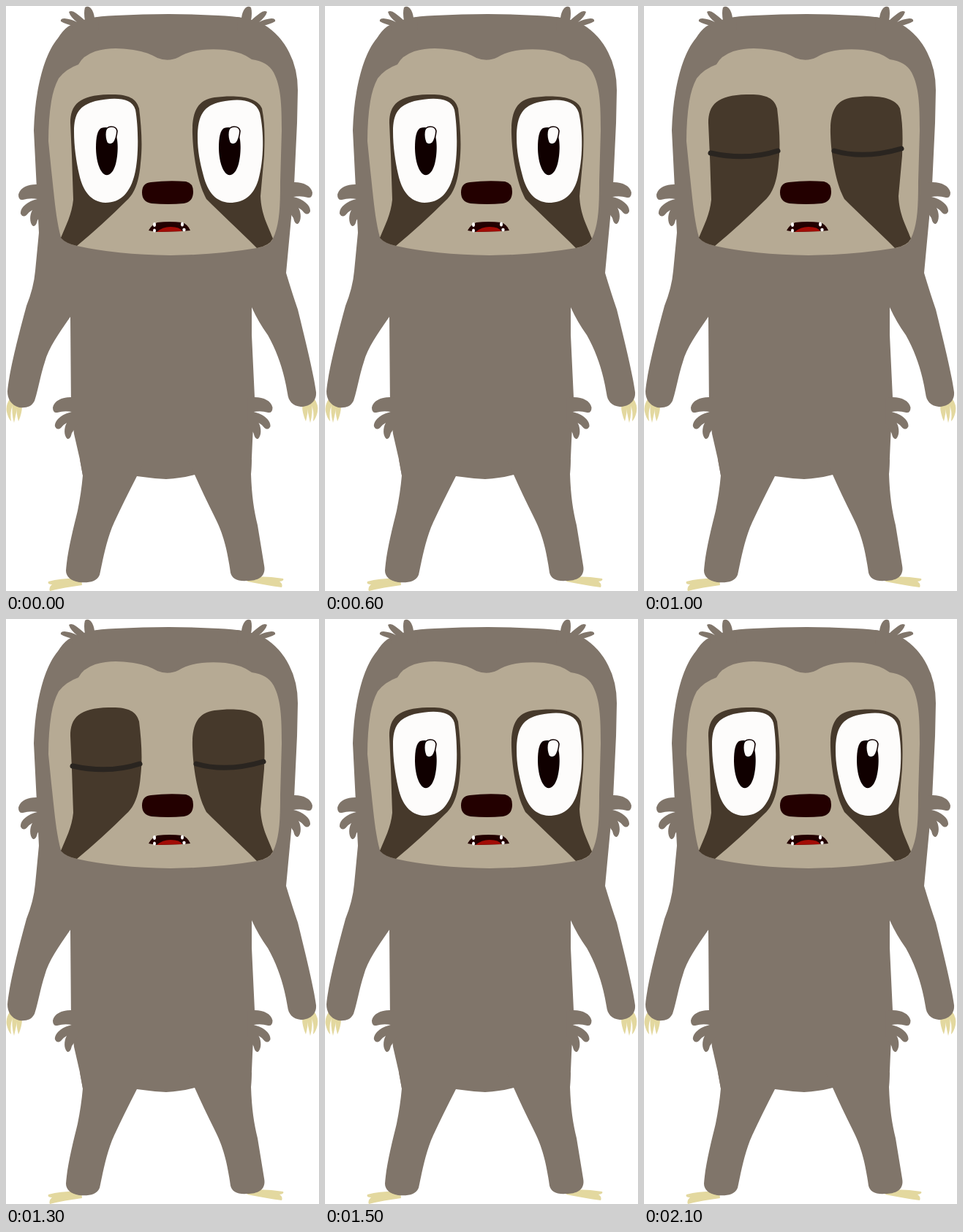
An HTML page that plays this animation: 428 by 800 pixels, repeating every 2.5 s.

```html
<!DOCTYPE html>
<html lang="en">
<head>
<meta charset="utf-8">
<title>Blinking sloth</title>
<style>
  html, body { margin: 0; width: 100%; height: 100%; overflow: hidden; background: #fff; }
  svg { display: block; width: 100%; height: 100%; }
  .fur { fill: #80756a; }
  .face { fill: #b6aa94; }
  .patch { fill: #46392b; }
  .white { fill: #fdfcfb; }
  .pupil { fill: #100000; }
  .shine { fill: #fdfcfb; stroke: #100000; stroke-width: 1.6; }
  .nose { fill: #230000; }
  .tongue { fill: #a20c06; }
  .claw { fill: #e3d89f; }
  .lid { fill: none; stroke: #2a2520; stroke-width: 7; stroke-linecap: round; }
  .open { animation: open 2.5s step-end infinite; }
  .closed { animation: closed 2.5s step-end infinite; }
  @keyframes open { 0%, 60% { opacity: 1; } 40% { opacity: 0; } }
  @keyframes closed { 0%, 60% { opacity: 0; } 40% { opacity: 1; } }
</style>
</head>
<body>
<svg viewBox="0 0 428 800" preserveAspectRatio="none">
  <defs>
    <path id="tuft" d="M98 536 Q92 535 88 535 C76 535 66 540 64 549 Q64 557 70 556 Q80 553 90 555
      C76 558 66 567 67 575 Q70 581 75 577 Q79 572 83 570 C79 577 79 588 84 592 Q88 593 90 584 L98 572Z"/>
    <path id="crest" d="M90 34 L92 27 Q82 25 75 21 Q74 17 80 17 Q90 18 97 22 Q88 15 86 8 Q90 5 96 10
      Q104 16 108 20 Q106 9 108 2 Q112 -1 116 3 Q120 8 121 16 L127 15 L126 34Z"/>
    <g id="handClaws">
      <path d="M6 536 Q-1 546 1 555 Q3 564 7 568 Q5 554 10 544Z"/>
      <path d="M9 541 Q7 556 11 570 Q14 557 16 545Z"/>
      <path d="M14 544 Q14 557 17 568 Q22 557 22 546Z"/>
    </g>
    <g id="pupil">
      <path class="pupil" d="M130 167 Q138 164 147 169 C154 178 154 200 150 216 C147 227 142 232 136 231 C128 228 123 211 123 193 C123 180 125 170 130 167Z"/>
      <path class="shine" d="M136 172 Q137 165 144 165 Q151 165 152 171 Q151 182 147 187 Q142 191 138 187 Q135 180 136 172Z"/>
    </g>
  </defs>

  <g class="claw">
    <use href="#handClaws"/>
    <use href="#handClaws" transform="matrix(-1 0 0 1 427 0)"/>
    <path d="M103 783 Q78 782 58 787 Q56 791 63 791 Q58 795 60 800 Q80 795 104 792Z"/>
    <path d="M330 781 Q355 779 379 783 Q381 786 374 787 Q379 790 377 795 Q355 792 330 787Z"/>
  </g>

  <g class="fur">
    <!-- head, arms and torso -->
    <path d="M85 28 Q108 14 150 13 Q225 9 290 13 Q330 14 352 25 Q375 39 387 63 Q399 86 399 115 L398 160 L394 245
      L390 290 L383 365 Q392 395 399 415 C410 460 420 500 424 528 C425 541 415 548 403 548 C392 547 386 540 385 530
      C380 500 372 475 358 450 Q345 432 336 412 L336 450 L340 535 L337 595 L335 640
      L258 641 Q240 646 219 647 Q200 646 179 643 L105 642 L101 620 L93 585 L89 550 L88 425
      C72 448 58 468 53 487 C47 505 44 525 39 540 C35 548 28 550 18 549 C7 546 2 537 2 527 C4 502 17 450 28 410
      Q38 385 40 362 L45 310 L42 250 L38 170 Q39 140 43 118 C48 90 56 62 71 44 Q78 33 85 28Z"/>
    <!-- legs -->
    <path d="M101 620 L105 642 Q103 665 98 690 C92 715 84 745 82 772 C82 780 88 786 100 788 C112 789 124 788 128 778
      C132 760 137 730 148 706 Q160 680 179 643 L190 620Z"/>
    <path d="M336 620 L335 640 C336 670 339 690 344 710 L353 765 C356 780 345 786 330 786 C316 787 309 783 307 775
      C302 740 297 722 285 698 Q270 668 258 641 L248 620Z"/>
    <use href="#tuft"/>
    <use href="#tuft" x="-47" y="-291"/>
    <use href="#tuft" transform="matrix(-1 0 0 1 428.500 0)"/>
    <use href="#tuft" transform="matrix(-1 0 0 1 483 -294)"/>
    <use href="#crest"/>
    <use href="#crest" transform="matrix(-1 0 0 1 443 0)"/>
  </g>

  <path class="face" d="M58 185 Q58 155 62 130 Q65 112 72 99 Q82 86 99 80 Q105 68 122 62 Q136 58 150 58
    C180 59 195 64 207 71 Q222 77 236 70 C252 60 275 58 300 60 Q323 63 336 73 Q358 76 366 91 C376 110 377 135 377 170
    L375 240 C375 275 374 300 365 318 Q361 328 343 331 Q290 340 225 341 Q150 340 97 328 Q82 325 75 316
    C68 290 66 260 62 225Z"/>

  <g class="patch">
    <path d="M88 160 C88 135 100 122 140 121 C165 120 178 125 182 140 C185 165 187 190 184 215
      C182 240 176 256 165 266 Q132 299 97 328 Q82 325 75 317 C82 300 90 285 92 265 L90 205Z"/>
    <path d="M255 175 C254 145 262 128 285 125 C310 122 342 122 350 140 C354 160 354 180 353 205 L348 260
      C349 285 358 300 365 318 Q360 328 343 331 C316 304 292 282 274 264 C264 246 256 210 255 175Z"/>
  </g>

  <g class="open">
    <path class="white" d="M93 172 C93 146 101 136 122 130 C146 125 172 124 177 142 C181 164 182 205 176 230
      C170 255 157 269 136 269 C116 268 105 253 100 230 C96 212 93 192 93 172Z"/>
    <path class="white" d="M262 180 C262 148 271 136 294 131 C318 126 341 127 347 146 C353 172 353 210 345 238
      C338 260 325 269 306 269 C287 268 276 255 270 232 C265 213 262 198 262 180Z"/>
    <use href="#pupil"/>
    <use href="#pupil" x="168"/>
  </g>
  <g class="closed">
    <path class="lid" d="M91 201 Q140 212 183 198"/>
    <path class="lid" d="M260 198 Q301 210 352 195"/>
  </g>

  <path class="nose" d="M198 241 Q222 238 246 240 Q256 242 256 254 Q256 268 243 270 Q222 272 199 270 Q186 268 186 255 Q186 242 198 241Z"/>
  <path class="nose" d="M195 307 Q199 299 207 296 Q223 294 241 296 Q249 299 252 307 L241 308 L206 309Z"/>
  <path class="tongue" d="M206 309 Q214 302 225 302 Q238 302 241 308Z"/>
  <g class="white">
    <ellipse cx="203" cy="299" rx="2" ry="3"/>
    <ellipse cx="241" cy="298.500" rx="2" ry="3"/>
    <ellipse cx="203" cy="307" rx="2" ry="2.500"/>
    <ellipse cx="243.500" cy="306" rx="2.200" ry="2.200"/>
  </g>
</svg>
</body>
</html>
```
